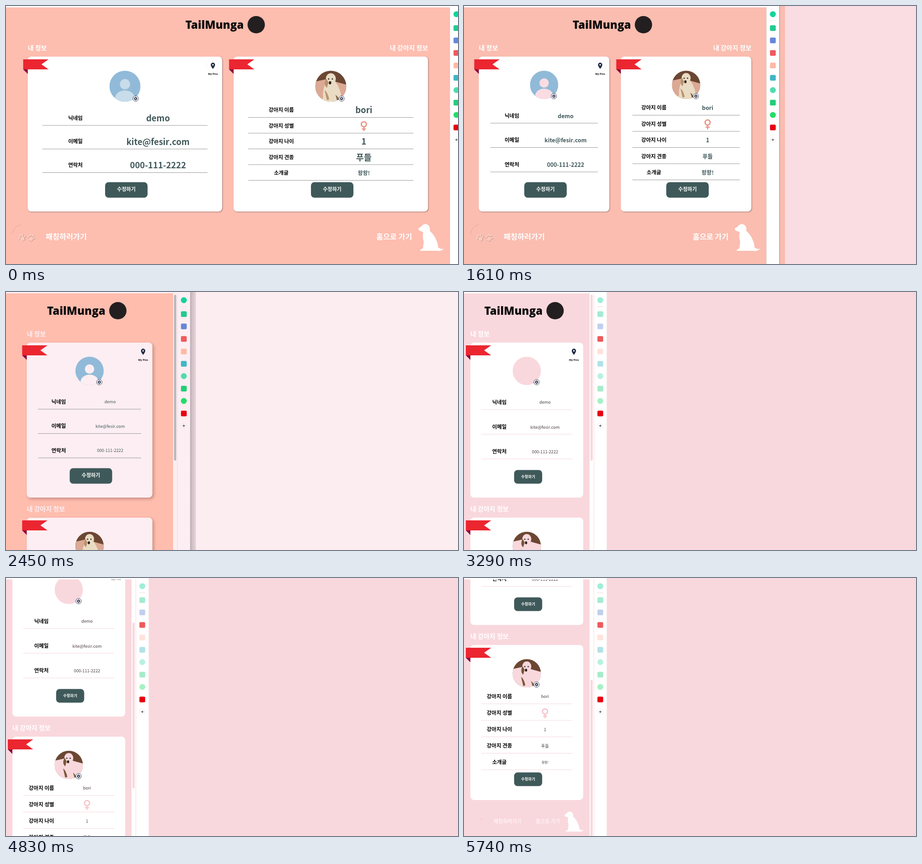
An HTML page with a canvas for the animation above (5810 ms loop, 990 by 566 pixels).

```html
<!DOCTYPE html>
<html lang="ko">
<head>
<meta charset="utf-8">
<title>Responsive profile page</title>
<style>
html, body { margin: 0; height: 100%; overflow: hidden; background: #fadce3; }
canvas { display: block; }
</style>
</head>
<body>
<canvas id="stage" width="990" height="566"></canvas>
<script>
const ctx = document.getElementById('stage').getContext('2d');
const LOOP = 5810, STEP = 70, TAU = Math.PI * 2;
const SANS = '"Noto Sans CJK KR", "Noto Sans CJK", "Noto Sans", sans-serif';
const WIDTHS = [[1120, 972], [1610, 662], [1750, 558], [2030, 469], [2380, 400], [2450, 375], [3010, 284]];
const SCROLL = [[4270, 0], [4830, 147], [5530, 348]];

const PALETTES = [
  { until: 1190, desk: '#fadce3', page: '#fdbdaf', white: '#fff', person: '#c8dcea' },
  { until: 2450, desk: '#fadce3', page: '#fabdb0', white: '#fff', person: '#fadce3' },
  { until: 2870, desk: '#fcedf0', page: '#ffbdae', white: '#fceef2', person: '#fceef2' },
  { until: LOOP, desk: '#f9d8dd', page: '#f9d8dd', white: '#fff', person: '#f9d8dd', faded: true },
];

// y, shape, colour, stays vivid when the palette fades
const ICONS = [
  [18, 'circle', '#0fd49b'], [48.5, 'square', '#1fcb90'], [75.5, 'square', '#6488d8'],
  [103, 'square', '#ee5a5c', true], [130.5, 'square', '#ffb9a5'], [157.5, 'square', '#3fb6c4'],
  [184.5, 'circle', '#4fdcae'], [212, 'square', '#21cf77'], [239, 'circle', '#24dd68'],
  [266.5, 'square', '#e60012', true],
];

const USER = [['닉네임', 'demo'], ['이메일', 'kite@fesir.com'], ['연락처', '000-111-2222']];
const DOG = [['강아지 이름', 'bori'], ['강아지 성별', '♀'], ['강아지 나이', '1'], ['강아지 견종', '푸들'], ['소개글', '왕왕!']];

let pal, mode;

function track(points, t) {
  if (t <= points[0][0]) return points[0][1];
  for (let i = 1; i < points.length; i++) {
    const [t0, v0] = points[i - 1], [t1, v1] = points[i];
    if (t <= t1) return v0 + (v1 - v0) * (t - t0) / (t1 - t0);
  }
  return points[points.length - 1][1];
}

function rect(x, y, w, h, color, r = 0) {
  ctx.fillStyle = color;
  ctx.beginPath();
  ctx.roundRect(x, y, w, h, r);
  ctx.fill();
}

function oval(x, y, rx, ry, color) {
  ctx.fillStyle = color;
  ctx.beginPath();
  ctx.ellipse(x, y, rx, ry, 0, 0, TAU);
  ctx.fill();
}

const disc = (x, y, r, color) => oval(x, y, r, r, color);

function ring(x, y, r, color, width, from = 0, to = TAU) {
  ctx.strokeStyle = color;
  ctx.lineWidth = width;
  ctx.beginPath();
  ctx.arc(x, y, r, from, to);
  ctx.stroke();
}

function shape(d, color, x = 0, y = 0, scale = 1) {
  ctx.save();
  ctx.translate(x, y);
  ctx.scale(scale, scale);
  ctx.fillStyle = color;
  ctx.fill(new Path2D(d));
  ctx.restore();
}

function text(str, x, y, size, color, { align = 'center', weight = 700, font = SANS } = {}) {
  ctx.font = `${weight} ${size}px ${font}`;
  ctx.textAlign = align;
  ctx.fillStyle = color;
  ctx.fillText(str, x, y + size * 0.37);
}

function inCircle(x, y, r, paint) {
  ctx.save();
  ctx.beginPath();
  ctx.arc(x, y, r, 0, TAU);
  ctx.clip();
  ctx.translate(x, y);
  ctx.scale(r, r);
  paint();
  ctx.restore();
}

function userAvatar() {
  rect(-1, -1, 2, 2, pal.faded ? pal.desk : '#91bad8');
  disc(0, -0.13, 0.33, pal.person);
  oval(0, 0.76, 0.63, 0.49, pal.person);
}

function dogPhoto() {
  const coat = pal.faded ? pal.desk : '#eadbc4';
  rect(-1, -1, 2, 2, '#6b4733');
  shape('M-1-.3L-.3-.45L1-.1V1H-1Z', pal.faded ? pal.desk : '#dba994');
  shape('M-.25-.35Q-.55.1-.5.75L-.7 1H.75Q.65.2.3-.3Z', coat);
  oval(0, -0.48, 0.32, 0.36, coat);
  shape('M-.3-.5Q-.5-.1-.25.1L-.15-.25ZM-.4.25Q-.2.4-.1.85L-.25.9Z', pal.faded ? '#7a5638' : '#b8946c');
  shape('M.3.55Q.5.7.55.95L.4.9Z', '#80603f');
  oval(-0.05, -0.22, 0.08, 0.1, '#2b211d');
  for (const x of [-0.14, 0.1]) disc(x, -0.47, 0.045, '#2b211d');
}

function gear(x, y) {
  disc(x, y, 6, '#fff');
  ring(x, y, 6, '#2b3350', 0.9);
  ring(x, y, 2.2, '#222b45', 1.6);
  for (let i = 0; i < 6; i++) {
    const a = i * TAU / 6 + TAU / 12;
    disc(x + Math.cos(a) * 3.1, y + Math.sin(a) * 3.1, 0.8, '#222b45');
  }
}

function female(x, y) {
  const color = pal.faded ? '#f6c5cc' : '#e99484';
  ring(x, y - 4, 5.6, color, 2.8);
  rect(x - 1.3, y + 2, 2.6, 9, color);
  rect(x - 4.5, y + 5, 9, 2.5, color);
}

function pin(x, y) {
  ring(x, y, 13.5, pal.faded ? '#fffafb' : '#f8f5f6', 1);
  shape('M0 7Q-4.7 1-4.7-2A4.7 4.7 0 0 1 4.7-2Q4.7 1 0 7Z', '#222b45', x, y);
  disc(x, y - 2, 1.7, pal.white);
  text('My Pins', x, y + 18, 5.6, '#111', { font: '"Noto Sans", sans-serif' });
}

function ribbon(x, y) {
  shape('M0 0H55.5L40 11L55.5 22H0Z', '#eb2630', x, y);
  shape('M0 22H10V32Z', '#8b0a3c', x, y);
}

function card(x, y, w, rows, photo) {
  const { wide, tiny, small, big } = mode;
  const mid = x + w / 2, r = wide ? 34 : 31;
  ctx.save();
  if (!pal.faded) {
    const soft = pal.white !== '#fff';
    ctx.shadowColor = soft ? 'rgba(110,60,50,.4)' : 'rgba(90,60,60,.6)';
    ctx.shadowBlur = soft ? 7 : 2;
    ctx.shadowOffsetX = ctx.shadowOffsetY = soft ? 3 : 1;
  }
  rect(x, y, w, 340, pal.white, 8);
  ctx.restore();
  ribbon(x - 10, y + 6);

  const avatarY = y + 31 + r;
  inCircle(mid, avatarY, r, photo);
  gear(mid + r * 0.69, avatarY + r * 0.8);

  const lineW = 0.905 * w - 23.6, left = mid - lineW / 2;
  const isUser = rows === USER;
  const first = isUser ? (wide ? 151 : tiny ? 147 : 146) : (wide ? 133.5 : tiny ? 129 : 128.5);
  const gap = isUser ? (wide ? 51.7 : tiny ? 54.1 : 53.5) : (wide ? 34.5 : tiny ? 36.2 : 35.5);
  const valueSize = wide ? 18.5 : small ? 9.2 : 12.3;
  rows.forEach(([label, value], i) => {
    const line = y + first + gap * i, valueX = left + lineW * 0.7;
    rect(left, line - 0.5, lineW, 1, pal.faded ? '#f6d7dc' : '#999');
    text(label, left + lineW * 0.2, line - 16.7, big ? 14.3 : 11.5, '#000', { weight: 900 });
    if (value === '♀') female(valueX, line - 15.5);
    else {
      const size = value === '왕왕!' ? (tiny ? 7 : 12) : valueSize;
      text(value, valueX, line - 16, size, pal.faded ? '#4a3c40' : '#3f5759', { weight: small ? 500 : 700 });
    }
  });

  const bw = tiny ? 61.5 : 93, bh = tiny ? 30 : 34;
  rect(mid + 3 - bw / 2, y + 309.5 - bh, bw, bh, '#3f595a', 7.5);
  text('수정하기', mid + 3, y + 308.5 - bh / 2 - (tiny ? 0 : 0.5), tiny ? 8.3 : 11, '#fff', { weight: 900 });
}

function paw(x, y, tilt) {
  ctx.save();
  ctx.translate(x, y);
  ctx.rotate(tilt);
  for (const [px, py, r] of [[0, 3, 4.8], [-6.3, -0.5, 2.3], [-2.6, -5, 2.5], [2.6, -5, 2.5], [6.3, -0.5, 2.3]]) {
    disc(px + 0.7, py + 0.7, r, '#b08c86');
    disc(px, py, r, '#fdcabe');
  }
  ctx.restore();
}

function footer(p) {
  const { tiny, two } = mode;
  const y = tiny ? 881.5 : two ? 506 : 890, size = tiny ? 11 : 16.3, scale = tiny ? 0.75 : 1;
  if (tiny) rect(37.5, y - 5.5, 1.5, 1.2, '#f0808a');
  else {
    paw(35, y + 2, -0.35);
    paw(55, y + 2, 0.2);
    ring(41, y, 28, 'rgba(175,125,115,.5)', 0.7, Math.PI * 1.08, Math.PI * 1.4);
  }
  const weight = tiny ? 500 : 700;
  text('패칭하러가기', tiny ? 65 : 87, y, size, '#fff', { align: 'left', weight });
  text('홈으로 가기', p - (tiny ? 65 : 82.5), y, size, '#fff', { align: 'right', weight });
  shape('M0 10Q6 7 10 2Q17-2 22 3Q27 9 25 15Q36 25 40 37Q44 46 43 51Q50 57 56 54Q51 61 40 59H4Q5 55 10 54L12 39Q8 28 11 18Q8 17 3 15Q0 14 0 10Z',
    '#fff', p - 13 - 56 * scale, y - (tiny ? 21.5 : 28), scale);
}

function page(p, scroll) {
  const { two, tiny } = mode;
  rect(0, 0, p, 566, pal.page);
  ctx.save();
  ctx.beginPath();
  ctx.rect(0, 3, p, 563);
  ctx.clip();
  ctx.translate(0, -scroll);

  const logo = p / 2 - 93;
  text('TailMunga', logo, 41, 24, '#0d0d0d', { align: 'left', weight: 800, font: '"Open Sans", sans-serif' });
  disc(logo + 155, 41, 19, '#231f20');

  const w = two ? (0.902 * p - 25) / 2 : p * (tiny ? 0.898 : 0.752);
  const x = two ? p * 0.049 : (p - w) / 2;
  const x2 = two ? x + w + 25 : x, down = two ? 0 : 384;
  text('내 정보', x, 92, 14, pal.white, { align: 'left' });
  text('내 강아지 정보', two ? x2 + w : x, 92 + down, 14, pal.white, { align: two ? 'right' : 'left' });
  card(x, 111, w, USER, userAvatar);
  card(x2, 111 + down, w, DOG, dogPhoto);
  if (!pal.faded || tiny) pin(x + w - 20.3, 131);
  footer(p);
  ctx.restore();
  rect(0, 0, p, 3, pal.white);
}

function sidebar(c) {
  rect(c, 0, 28.5, 566, pal.white);
  rect(c, 3, 1, 563, pal.faded ? '#f9dde1' : '#e3dfe1');
  const x = c + 14.5;
  for (const [y, kind, color, vivid] of ICONS) {
    ctx.globalAlpha = pal.faded && !vivid ? 0.4 : 1;
    if (kind === 'circle') disc(x, y, 6.5, color);
    else rect(x - 6.3, y - 6.3, 12.6, 12.6, color, 2.5);
  }
  ctx.globalAlpha = 1;
  rect(x - 7, 32, 14, 1, pal.faded ? '#f9d8dd' : '#e8e4e6');
  ring(x, 293.5, 6, '#eee6e8', 0.8);
  rect(x - 2.7, 293, 5.4, 1, '#333');
  rect(x - 0.5, 290.8, 1, 5.4, '#333');
}

function windowEdge(x) {
  if (pal.faded) return;
  const soft = pal.white !== '#fff';
  const fade = ctx.createLinearGradient(x, 0, x + 12.5, 0);
  fade.addColorStop(0, soft ? '#aa9ba3' : '#a79393');
  fade.addColorStop(0.18, soft ? '#cbbac1' : pal.page);
  fade.addColorStop(1, soft ? '#e8d5dc' : pal.page);
  rect(x, 0, 12.5, 566, fade);
}

function draw(t) {
  pal = PALETTES.find(p => t < p.until);
  const c = Math.round(track(WIDTHS, t)), scroll = Math.round(track(SCROLL, t));
  mode = { wide: c > 768, two: c > 570, big: c > 400 && c <= 570, small: c < 384, tiny: c < 310 };
  rect(0, 0, 990, 566, pal.desk);
  page(mode.two ? c : c - 9, scroll);
  if (!mode.two) {
    rect(c - 9, 0, 9, 566, pal.white);
    rect(c - 7, 6 + scroll * 0.624, 5, 364, pal.faded ? pal.desk : '#bcb9ba', 2.5);
  }
  sidebar(c);
  windowEdge(c + 28.5);
}

function tick() {
  const t = performance.now() % LOOP;
  draw(Math.floor(t / STEP) * STEP);
  requestAnimationFrame(tick);
}
tick();
</script>
</body>
</html>
```
